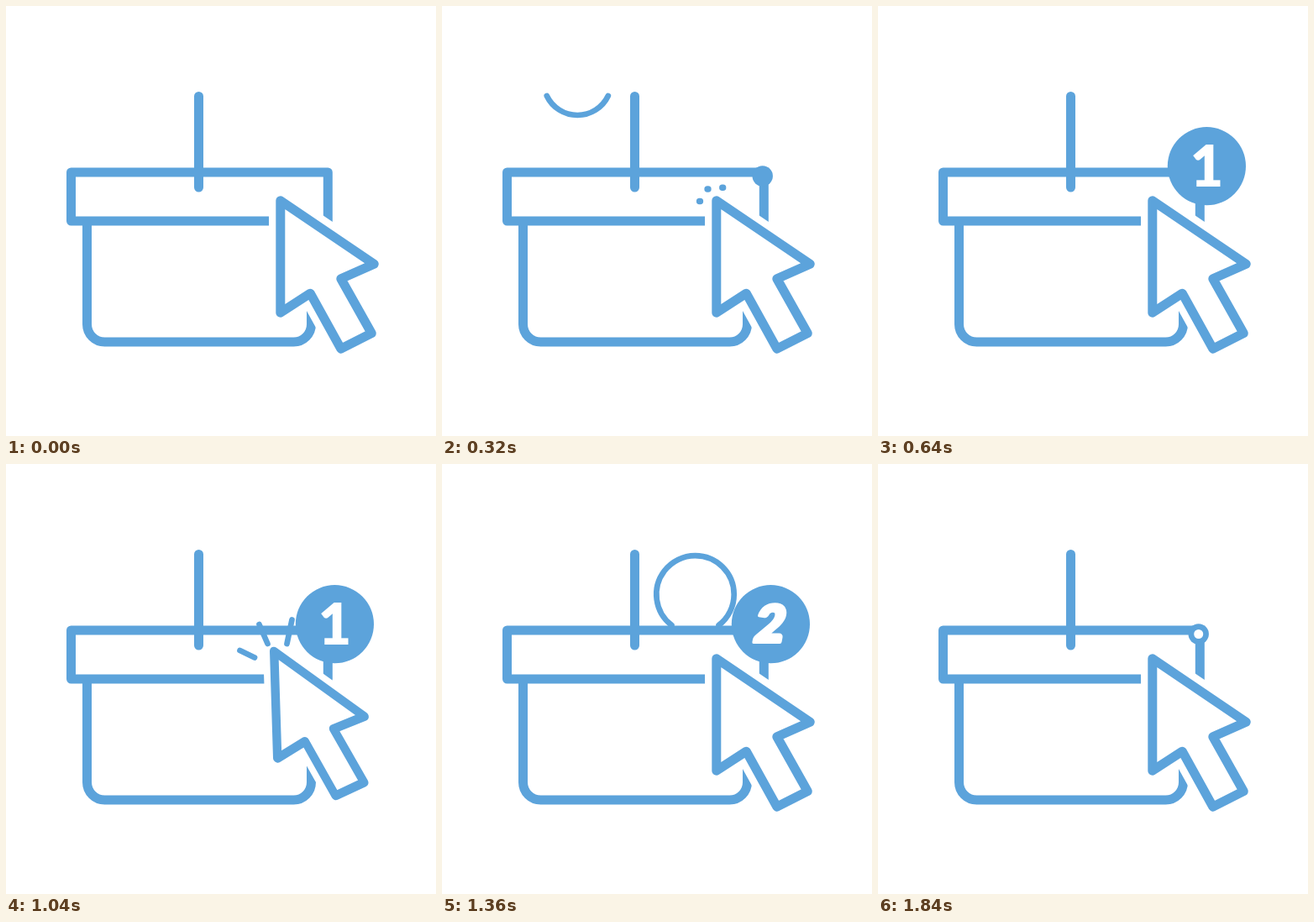
Recreate the animation shown at these times as an HTML page with a canvas. Size 512 px wide and 512 px high, loop 1.92 s.

```html
<!DOCTYPE html>
<html>
<head>
<meta charset="utf-8">
<style>
html, body { margin: 0; width: 100%; height: 100%; overflow: hidden; background: #fff; }
canvas { display: block; }
</style>
</head>
<body>
<canvas id="stage" width="512" height="512"></canvas>
<script>
const ctx = document.getElementById('stage').getContext('2d');
const BLUE = '#5ca3db', LOOP = 1920, STEP = 80;
const clamp = (v, lo = 0, hi = 1) => Math.min(hi, Math.max(lo, v));
const mix = (a, b, k) => a + (b - a) * k;

const basket = new Path2D(
  'M77.5 198H383.3V256H77.5ZM96.5 256V379A21 21 0 0 0 117.5 400H342.5A21 21 0 0 0 363.5 379V256M229.5 107.5V216');
const pointer = new Path2D('M0 0L111.5 75.5 72 93 108.5 158 72 176.5 35.5 110.5 0 133.5Z');

// Each ray: pressed outer end, pressed inner end, resting dot
const rays = [
  [278.5, 222, 296, 230.5, 307, 232.5],
  [301.5, 191, 311.5, 214, 316.5, 218],
  [340.5, 185.5, 334.5, 214, 334.2, 216.2]
];

function stroke(width, path, color = BLUE) {
  ctx.lineWidth = width;
  ctx.strokeStyle = color;
  path ? ctx.stroke(path) : ctx.stroke();
}

function drawBasket(t) {
  const s = 1 - 0.0235 * clamp(1 - Math.abs(t - 480) / 160);
  ctx.save();
  ctx.translate(72, 405.5);
  ctx.scale(s, s);
  ctx.translate(-72, -405.5);
  stroke(11, basket);
  ctx.restore();
}

// Only the part of the ball between the pole top and the basket rim shows
function drawBall(x, y, r) {
  const top = 107, rim = 192;
  if (y + r <= top || y - r >= rim) return;
  const from = Math.asin(clamp((top - y) / r, -1, 1));
  const to = Math.asin(clamp((rim - y) / r, -1, 1));
  ctx.beginPath();
  ctx.arc(x, y, r, from, to);
  ctx.moveTo(x - r * Math.cos(to), y + r * Math.sin(to));
  ctx.arc(x, y, r, Math.PI - to, Math.PI - from);
  stroke(6.7);
}

function drawDigit(digit, scale, angle, skew, weight) {
  ctx.save();
  ctx.rotate(angle);
  ctx.transform(scale, 0, -skew * scale, scale, 0, 0);
  ctx.font = '900 68px Lato, sans-serif';
  ctx.textAlign = 'center';
  ctx.fillStyle = '#fff';
  ctx.fillText(digit, 0, 24.3);
  if (weight) {
    ctx.lineWidth = weight;
    ctx.strokeStyle = '#fff';
    ctx.strokeText(digit, 0, 24.3);
  }
  ctx.restore();
}

function drawBadge(t) {
  if (t < 320) return;
  const k = t < 1000 ? clamp((t - 320) / 320) : clamp((1840 - t) / 160);
  ctx.save();
  ctx.translate(mix(381.7, 391.4, k), mix(202.5, 190.7, k));
  ctx.beginPath();
  ctx.arc(0, 0, mix(12.2, 46.6, k), 0, 7);
  ctx.fillStyle = BLUE;
  ctx.fill();
  if (k > 0) {
    const flip = clamp(1 - Math.abs(t - 1340) / 150);
    drawDigit(t < 1320 ? '1' : '2', k * (1 - 0.12 * flip), -0.7 * (1 - k), 0.22 * flip,
      5 * flip + 3 * (1 - k));
  } else if (t > 1000) {
    ctx.beginPath();
    ctx.arc(0, 0, 5.5, 0, 7);
    ctx.fillStyle = '#fff';
    ctx.fill();
  }
  ctx.restore();
}

function drawPointer(press) {
  ctx.save();
  ctx.translate(326.8 - 7.6 * press, 231.7 - 8.7 * press);
  ctx.transform(1 - 0.056 * press, 0.0485 * press, 0.03 * press, 1 - 0.045 * press, 0, 0);
  stroke(27.6, pointer, '#fff');
  ctx.fillStyle = '#fff';
  ctx.fill(pointer);
  stroke(11, pointer);
  ctx.restore();
}

function drawRays(press) {
  ctx.beginPath();
  for (const [x1, y1, x2, y2, x0, y0] of rays) {
    ctx.moveTo(mix(x0 - 0.4, x1, press), mix(y0, y1, press));
    ctx.lineTo(mix(x0 + 0.4, x2, press), mix(y0, y2, press));
  }
  stroke(mix(7.5, 6.7, press));
}

function draw(t) {
  const sinceClick = t < 1040 ? t - 160 : t - 1040;
  const clicking = sinceClick >= 0 && sinceClick <= 160;
  const press = clicking ? 1 - sinceClick / 160 : 0;
  ctx.fillStyle = '#fff';
  ctx.fillRect(0, 0, 512, 512);
  ctx.lineCap = ctx.lineJoin = 'round';
  drawBasket(t);
  drawBall(mix(161.3, 162.8, clamp((t - 320) / 160)), 89.5 + (t - 320) * 0.553,
    clamp(40.5 + (t - 320) * 0.134, 1, 62));
  drawBall(301.5, 155.3 + (t - 1360) * 0.477, 46.2);
  drawPointer(press);
  drawBadge(t);
  if (clicking) drawRays(press);
}

function tick() {
  draw(Math.floor(performance.now() % LOOP / STEP) * STEP);
  requestAnimationFrame(tick);
}
tick();
</script>
</body>
</html>
```
